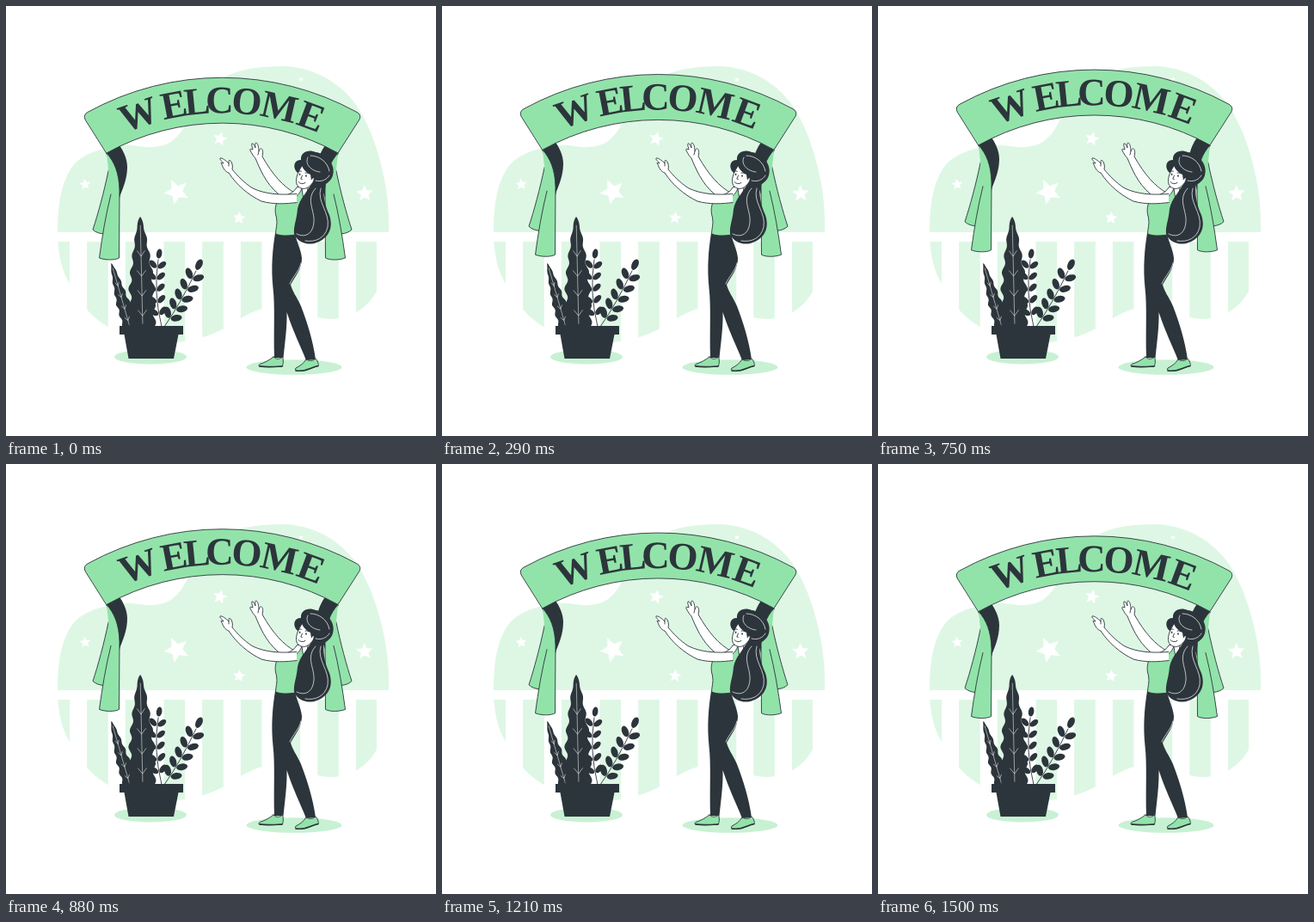
Animation, 500 px wide and 500 px high, one loop 1540 ms. Source, as an HTML page:

```html
<!DOCTYPE html>
<html lang="en">
<head>
<meta charset="utf-8">
<title>Welcome banner</title>
<style>
html, body { margin: 0; width: 100%; height: 100%; overflow: hidden; background: #fff; }
svg { display: block; width: 100vw; height: 100vh; }
.pale { fill: #def7e5; }
.shade { fill: #c8f1d3; }
.dark { fill: #2c353b; }
.ink { stroke: #2c353b; stroke-width: .9; stroke-linejoin: round; stroke-linecap: round; }
.sole { stroke-width: 1.6; }
.green { fill: #92e3a9; }
.white { fill: #fff; }
.line { fill: none; }
.hair { fill: none; stroke: #fff; stroke-width: .7; stroke-linecap: round; }
text { font: bold 45px "Liberation Serif", "Times New Roman", serif; text-anchor: middle; fill: #2c353b; }
</style>
</head>
<body>
<svg viewBox="0 0 500 500" xmlns="http://www.w3.org/2000/svg">
  <defs>
    <clipPath id="blob"><path d="M60 262C60 290 65 308 75 325C88 350 104 365 120 374C145 388 175 392 200 391C225 388 245 381 262 370C285 355 298 350 318 349C340 349 352 364 378 364C400 364 420 352 431 332V262Z"/></clipPath>
    <g id="drape">
      <path class="dark" d="M117 171L132 162C136 168 141 177 141 187C141 201 136 212 132 222Z"/>
      <path class="green ink" d="M117 172C121 180 121 186 119 192C114 216 107 242 101 260C104 263 108 264.500 113 265L132 222C132 202 129 187 117 172Z"/>
      <path class="green ink" d="M117 171C126 181 131.500 194 132 214L131.500 293C126 296 115 295.500 108.500 293C112 267 116 243 122 219"/>
    </g>
  </defs>
  <path class="pale" d="M60 263C60 228 65 204 77 187C89 171 112 165 135 162C150 161 158 165 171 164C188 163 197 156 205 144C219 121 228 99 254 83C272 73 296 70 322 70C358 71 386 88 405 112C430 146 445 207 445 248V263Z"/>
  <g id="stripes" class="pale" clip-path="url(#blob)"></g>
  <g id="stars" class="white"></g>
  <ellipse class="shade" cx="168" cy="408" rx="42" ry="8.500"/>
  <ellipse class="shade" cx="335" cy="420" rx="55.500" ry="8.800"/>

  <g id="banner">
    <use href="#drape"/>
    <use href="#drape" transform="translate(503 0) scale(-1 1)"/>
    <path class="green ink" d="M92 132Q89.500 126.500 95 123.500A325 325 0 0 1 408 123.500Q413.500 126.500 411 132L386 171A277 277 0 0 0 117 171Z"/>
    <g id="word"></g>
  </g>

  <g id="plant"></g>
  <path class="dark" d="M132 372H206V382H200.500L195 410H142.500L137.500 382H132Z"/>

  <g id="woman">
    <!-- far arm -->
    <path class="white ink" d="M337 218C322 210 310 196 298 175C299 171 299 167 297 166C296 165 295 167 294 169C294 165 293 160 291 159C289 159 290 163 290 165C289 162 287 159 286 160C285 162 287 165 287 167C285 166 283 166 284 168C286 172 288 175 290 177C295 189 302 206 316 218C322 224 330 225 337 222Z"/>
    <path class="line ink" d="M294 169L293 173"/>
    <!-- legs -->
    <path class="dark" d="M313 264C310 283 308 303 310.500 328C313 349 311 379 312 409H322.500C324.500 390 327 372 326.500 356C334 379 342 394 349 412L360 411C357 389 350 367 343 349C338 338 333 332 331 324C337 313 344 306 344 293C343 283 338 275 336 264Z"/>
    <path class="hair" d="M343 299C341 308 334 314 330 323"/>
    <!-- shoes -->
    <path class="green ink" d="M311 408C306 412 300 415 295 416.500C293 418 294 419.500 297 419.500H320.500C322.500 418 323 412 321.500 408C318 411 314 411 311 408Z"/>
    <path class="line ink sole" d="M295 418.800C304 420.500 313 419.500 321.500 418.800"/>
    <path class="green ink" d="M349 411C346 416 341 419 337 421C335 424 338 424.500 343 424.500C351 424.500 355 420 363 418.500C364 416 362 412 360 410C357 413 353 413 349 411Z"/>
    <path class="line ink sole" d="M337 424C350 426 354 420 363 418.500"/>
    <!-- top -->
    <path class="white ink" d="M338 211C336 215 332 218 326 220L337 231L350 220L351 210Z"/>
    <path class="green ink" d="M317 224C313 231 312 238 314.500 246C316 254 313.500 259 313.500 265C321 268 329 267 337 266C339 254 344 240 346 226L344 212C341 219 338 222 334 222C327 222 322 220 317 224Z"/>
    <!-- near arm -->
    <path class="white ink" d="M338 218.500C319 220 302 219 287 212C276 205 269 197 263 190C264 186 263 182 261 180C259 178 259 181 259 183C256 180 251 176 249 177C248 178.500 252 181 253 183C250 182 249 182 251 184C252 188 255 193 259 194C268 208 282 220 297 227C311 231 326 230 338 228.500"/>
    <path class="line ink" d="M259 183L259 186"/>
    <!-- ponytail -->
    <path class="dark" d="M356 205C351 216 341 224 339 236C338 249 334 256 335 265C340 277 354 279 364 274C378 267 380 255 376 243C370 230 368 218 370 203Z"/>
    <path class="hair" d="M360 212C348 225 359 237 358 251C357 265 348 270 338 265M366 212C361 228 377 240 374 257C371 270 360 275 348 273"/>
    <!-- head -->
    <path class="dark" d="M338 193C333 187 335 179 343 179C342 170 352 166 360 170C372 171 384 184 380 197C377 207 364 213 355 208Z"/>
    <path class="white ink" d="M345 185C340 191 336 201 338 207C340 212 346 214 351 211C355 208 359 204 358 199L354 194C349 192 346 189 345 185Z"/>
    <path class="dark" d="M344 180C342 187 348 193 354 196L355 203C357 198 361 199 360 204C363 211 372 206 374 202L366 180Z"/>
    <path class="hair" d="M351 176C347 184 355 192 365 193M354 174C364 174 374 181 376 192M360 203C367 205 373 202 376 197"/>
    <ellipse class="dark" cx="341.600" cy="195.700" rx=".8" ry="1.200"/>
    <ellipse class="dark" cx="349" cy="197.500" rx=".8" ry="1.200"/>
    <path class="line ink" d="M340.500 192.500Q342 191 343.500 192.200M348 194Q350 193.200 352 194.800M344.500 197L342.800 201L344.300 201.500M340 204.500Q343.500 208.500 348 205.500"/>
  </g>
</svg>
<script>
const $ = id => document.getElementById(id);
const fill = (id, parts) => { $(id).innerHTML = parts.join(""); };
const fix = v => v.toFixed(2);
const poly = (pts, attrs) => `<polygon ${attrs} points="${pts.map(p => p.map(fix).join()).join(" ")}"/>`;

function star(x, y, r, tilt) {
  const pts = [];
  for (let i = 0; i < 10; i++) {
    const a = tilt + i * Math.PI / 5, q = i % 2 ? r * 0.46 : r;
    pts.push([x + q * Math.sin(a), y - q * Math.cos(a)]);
  }
  return poly(pts, "");
}

// Wavy blade from base to tip, with a pale vein and side veins
function blade(x0, y0, x1, y1, width, waves) {
  const dx = x1 - x0, dy = y1 - y0, len = Math.hypot(dx, dy);
  const nx = -dy / len, ny = dx / len;
  const at = (s, off) => [x0 + dx * s + nx * off, y0 + dy * s + ny * off];
  const half = s => width * Math.min(1, Math.pow((1 - s) * 1.6, 0.65)) * (0.92 + 0.12 * Math.sin(s * waves * 2 * Math.PI));
  const left = [], right = [];
  for (let i = 0; i <= 80; i++) {
    const s = i / 80;
    left.push(at(s, -half(s)));
    right.unshift(at(s, half(s)));
  }
  let d = `M${at(0.03, 0)}L${at(0.92, 0)}`;
  for (let s = 0.1; s < 0.75; s += 0.18) {
    const w = half(s) * 0.4;
    d += `M${at(s + 0.05, -w)}L${at(s, 0)}L${at(s + 0.05, w)}`;
  }
  return poly(left.concat(right), 'class="dark"') + `<path class="hair" stroke-opacity=".75" d="${d}"/>`;
}

// Curved stem with paired oval leaves
function sprig(a, b, c, pairs, size) {
  const q = (s, k) => (1 - s) ** 2 * a[k] + 2 * s * (1 - s) * b[k] + s * s * c[k];
  const leaf = (x, y, deg) =>
    `<ellipse class="dark" rx="${size}" ry="${size * 0.58}" transform="translate(${fix(x)} ${fix(y)}) rotate(${fix(deg)}) translate(${size + 1.5} 0)"/>`;
  let out = `<path class="line ink" d="M${a}Q${b} ${c}"/>`;
  for (let i = 0; i < pairs; i++) {
    const s = 0.16 + 0.7 * i / (pairs - 1), x = q(s, 0), y = q(s, 1);
    const deg = Math.atan2(q(s + 0.02, 1) - y, q(s + 0.02, 0) - x) * 180 / Math.PI;
    out += leaf(x, y, deg - 48) + leaf(x, y, deg + 48);
  }
  const tip = Math.atan2(c[1] - b[1], c[0] - b[0]) * 180 / Math.PI;
  return out + leaf(c[0], c[1], tip);
}

fill("stripes", Array.from({ length: 9 }, (_, i) =>
  `<rect x="${fix(49.5 + i * 44.68)}" y="274" width="24.600" height="120"/>`));

fill("stars", [
  star(198.5, 216, 15, -0.43), star(249, 154.5, 8.5, 0.25), star(92, 207.5, 6.8, -0.1),
  star(271, 246.5, 7.5, 0.1), star(417, 218, 10, -0.05), star(343, 85.5, 3, 0.1)
]);

const angles = [-19, -10.8, -5.6, -0.5, 5.6, 13, 20.4];
fill("word", [..."WELCOME"].map((ch, i) =>
  `<text x="251" y="124.500" transform="rotate(${angles[i]} 251 408)">${ch}</text>`));

fill("plant", [
  sprig([181, 373], [171, 332], [177, 295], 5, 5.6),
  sprig([184, 373], [203, 346], [221, 308], 5, 6.6),
  blade(144, 373, 122.5, 299, 8, 6),
  blade(159, 373, 156, 245, 15, 6.5)
]);

const FRAMES = 37, RATE = 24, LIFT = 10;
const banner = $("banner");

function draw(ms) {
  const k = Math.floor((ms % 1540 + 5) * RATE / 1000) % FRAMES;
  const p = (k + 1) / FRAMES;
  const up = LIFT * (1 - Math.abs(1 - 2 * p));
  banner.setAttribute("transform", `translate(0 ${fix(0.5 - up)})`);
}

const start = performance.now();
function tick(now) {
  draw(Math.max(0, now - start));
  requestAnimationFrame(tick);
}
draw(0);
requestAnimationFrame(tick);
</script>
</body>
</html>
```
